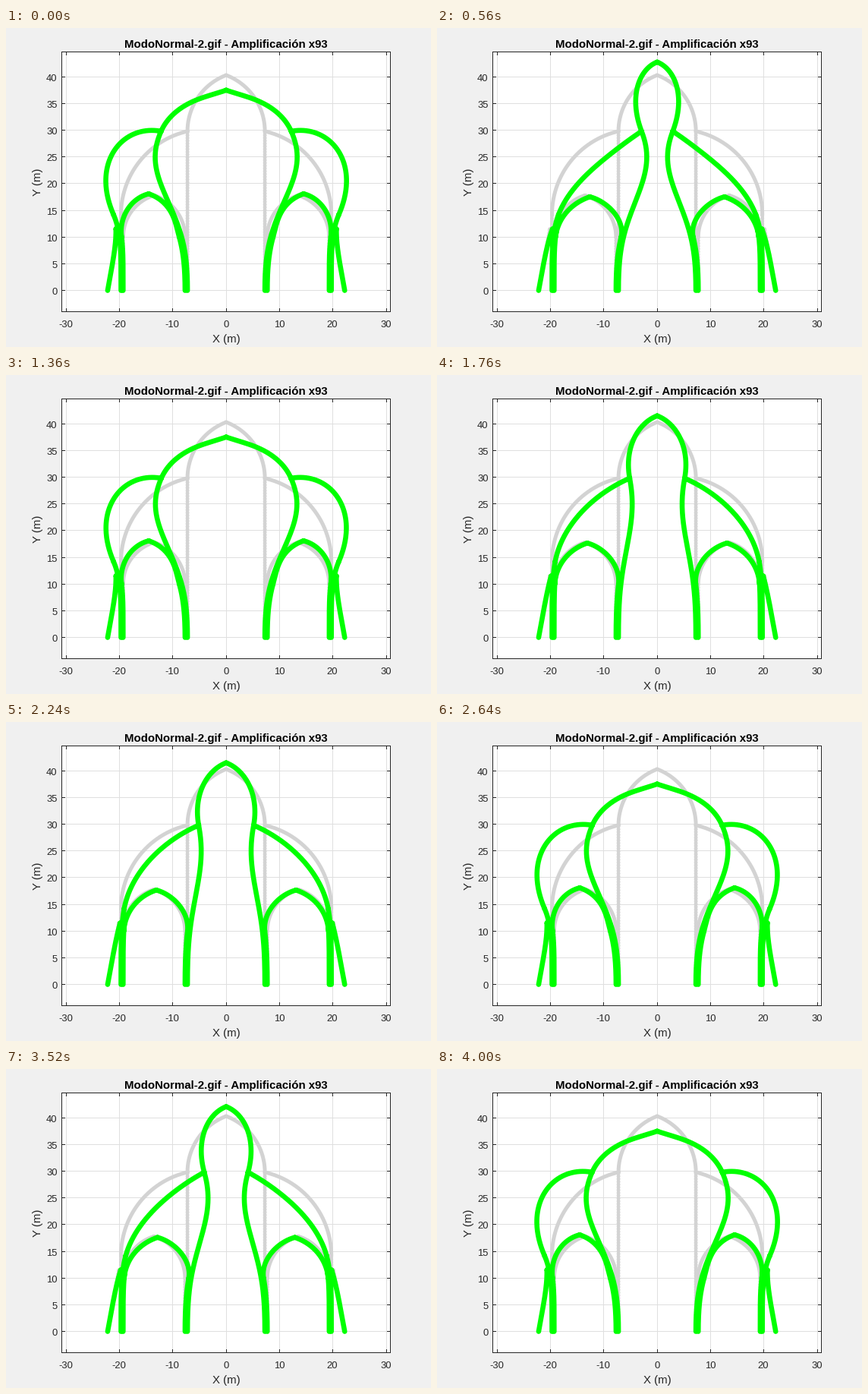
These frames come from a looping animation (560 px wide and 420 px high, 4.08 s). A matplotlib script:

```python
import numpy as np
import matplotlib.pyplot as plt
from matplotlib.animation import FuncAnimation

W, H, DPI = 560, 420, 100
PX = 72 / DPI                      # points per pixel
FRAMES, STEP, CYCLES = 51, 80, 3
DARK = (0.15, 0.15, 0.15)
LEFT, RIGHT, TOP, BOTTOM = 73.5, 506.5, 31.5, 373.5
SCALE = 7.035                      # pixels per metre


def sx(x):
    return 290.1 + SCALE * np.asarray(x)


def sy(y):
    return 345.6 - SCALE * np.asarray(y)


# Sideways sway of the nave wall and the outer column, by height
knots = np.array([5, 10, 15, 17.1, 21.4, 24.6, 27.8, 30.2])
sway = np.array([0.2, 1.1, 2.85, 3.85, 5.55, 6.05, 5.55, 4.82])
wall_fit = np.append(np.polyfit(knots, sway / knots**2, 4), [0, 0])


def wall_u(y):
    return np.polyval(wall_fit, y)


def wall_slope(y):
    return np.polyval(np.polyder(wall_fit), y)


SIDE_BASE, SIDE_SWAY, SIDE_POWER = 14.2, 1.4, 4.4


def outer_u(y):
    return SIDE_SWAY * (y / SIDE_BASE) ** SIDE_POWER


def outer_slope(y):
    return SIDE_SWAY * SIDE_POWER / SIDE_BASE * (y / SIDE_BASE) ** (SIDE_POWER - 1)


def post(x0, y0, x1, y1, u, n=50):
    p = np.column_stack([np.linspace(x0, x1, n), np.linspace(y0, y1, n)])
    return p, np.column_stack([u(p[:, 1]), np.zeros(n)])


def arch(cx, cy, r, t0, t1, rot0, rot1, d0, d1, n=90):
    """Arc that bends without stretching between two end movements."""
    tau = np.linspace(0, 1, n)
    t = t0 + (t1 - t0) * tau
    p = np.column_stack([cx + r * np.cos(t), cy + r * np.sin(t)])
    dp = np.diff(p, axis=0)
    turn = np.column_stack([-dp[:, 1], dp[:, 0]])

    def travel(rot):
        mid = (rot[1:] + rot[:-1]) / 2
        return np.vstack([[0, 0], np.cumsum(mid[:, None] * turn, axis=0)])

    base = travel(rot0 + (rot1 - rot0) * tau)
    b1 = travel(tau * (1 - tau))
    b2 = travel(tau**2 * (1 - tau))
    need = np.subtract(d1, d0) - base[-1]
    k1, k2 = np.linalg.solve(np.column_stack([b1[-1], b2[-1]]), need)
    return p, np.array(d0) + base + k1 * b1 + k2 * b2


def radius(half, rise):
    return (half**2 + rise**2) / (2 * half)


# Right half of the section
SPRING, APEX = 29.8, 40.3
WALL, PIER_IN, PIER_OUT, OUTER = 7.25, 7.7, 19.3, 19.7
LOW, LOW_RISE = 10, 7.8
PROP_X, PROP_Y = 20.1, 11.5

posts = [
    post(WALL, 0, WALL, SPRING, wall_u, 90),
    post(PIER_IN, 0, PIER_IN, LOW, wall_u),
    post(PIER_OUT, 0, PIER_OUT, PROP_Y, outer_u),
    post(OUTER, 0, OUTER, SIDE_BASE, outer_u),
    post(22.2, 0, PROP_X, PROP_Y, outer_u),
    post(PROP_X, PROP_Y, PIER_OUT, PROP_Y, outer_u, 5),
]

joint = (wall_u(SPRING), 0)
joint_rot = -wall_slope(SPRING)

rn = radius(WALL, APEX - SPRING)
nave = arch(WALL - rn, SPRING, rn, 0, np.arccos(1 - WALL / rn),
            joint_rot, 0, joint, (0, -2.8))

rs = radius(OUTER - WALL, SPRING - SIDE_BASE)
side = arch(OUTER - rs, SIDE_BASE, rs, 0, np.arccos(1 - (OUTER - WALL) / rs),
            -outer_slope(SIDE_BASE), joint_rot, (outer_u(SIDE_BASE), 0), joint)

half = (PIER_OUT - PIER_IN) / 2
rl = radius(half, LOW_RISE)
span = np.arccos(1 - half / rl)
crown, crown_rot = (1.0, 0.3), 0.05
low_out = arch(PIER_OUT - rl, LOW, rl, 0, span, -outer_slope(LOW), crown_rot,
               (outer_u(LOW), 0), crown)
low_in = arch(PIER_IN + rl, LOW, rl, np.pi, np.pi - span, -wall_slope(LOW), crown_rot,
              (wall_u(LOW), 0), crown)
arches = [nave, side, low_out, low_in]


def join(members):
    """Both halves as one pair of arrays, with gaps between members."""
    gap = np.full((1, 2), np.nan)
    pts, moves = [], []
    for sign in (1, -1):
        for p, d in members:
            pts += [p * (sign, 1), gap]
            moves += [d * (sign, 1), gap]
    return np.vstack(pts), np.vstack(moves)


fig = plt.figure(figsize=(W / DPI, H / DPI), dpi=DPI, facecolor="#f0f0f0")
ax = fig.add_axes([0, 0, 1, 1])
ax.set_xlim(0, W)
ax.set_ylim(H, 0)
ax.axis("off")


def rule(x0, y0, x1, y1, color=DARK, z=5):
    ax.plot([x0, x1], [y0, y1], color=color, lw=PX, solid_capstyle="projecting",
            snap=False, zorder=z)


def label(x, y, s, size, **kw):
    style = dict(color=DARK, ha="center", va="baseline", family="Liberation Sans")
    style.update(kw)
    ax.text(x, y, s, fontsize=size * PX, **style)


ax.add_patch(plt.Rectangle((LEFT, TOP), RIGHT - LEFT, BOTTOM - TOP, fc="white", ec="none",
                           snap=False, zorder=0))
GRID = (0.873, 0.873, 0.873)
for v in range(-30, 31, 10):
    x = np.floor(sx(v)) + 0.5
    rule(x, TOP, x, BOTTOM, GRID, 1)
    rule(x, BOTTOM, x, BOTTOM - 4)
    rule(x, TOP, x, TOP + 4)
    label(x - 0.5, 394, str(v), 13)
for v in range(0, 41, 5):
    y = np.floor(sy(v)) + 0.5
    rule(LEFT, y, RIGHT, y, GRID, 1)
    rule(LEFT, y, LEFT + 4, y)
    rule(RIGHT, y, RIGHT - 4, y)
    label(67.5, y + 5.5, str(v), 13, ha="right")
for y in (TOP, BOTTOM):
    rule(LEFT, y, RIGHT, y)
for x in (LEFT, RIGHT):
    rule(x, TOP, x, BOTTOM)

label(290, 26, "ModoNormal-2.gif - Amplificación x93", 15, color="black", weight="bold")
label(290, 414, "X (m)", 15)
label(49, 202.5, "Y (m)", 15, rotation=90, va="center", ha="right")

# Resting shape: beaded posts, smooth arches
REST = dict(color="#d3d3d3", lw=5 * PX, zorder=2)
p, _ = join(posts)
ax.plot(sx(p[:, 0]), sy(p[:, 1]), ls=(0, (0.01, 0.72)), dash_capstyle="round", **REST)
p, _ = join(arches)
ax.plot(sx(p[:, 0]), sy(p[:, 1]), solid_capstyle="round", **REST)

rest, mode = join(posts + arches)
shape, = ax.plot([], [], color="#00ff00", lw=6.6 * PX, solid_capstyle="round",
                 solid_joinstyle="round", zorder=3)


def draw(i):
    amp = np.cos(2 * np.pi * CYCLES * i / (FRAMES - 1))
    q = rest + amp * mode
    shape.set_data(sx(q[:, 0]), sy(q[:, 1]))
    return shape,


anim = FuncAnimation(fig, draw, frames=FRAMES, interval=STEP, repeat=True, repeat_delay=0)
plt.show()
```
